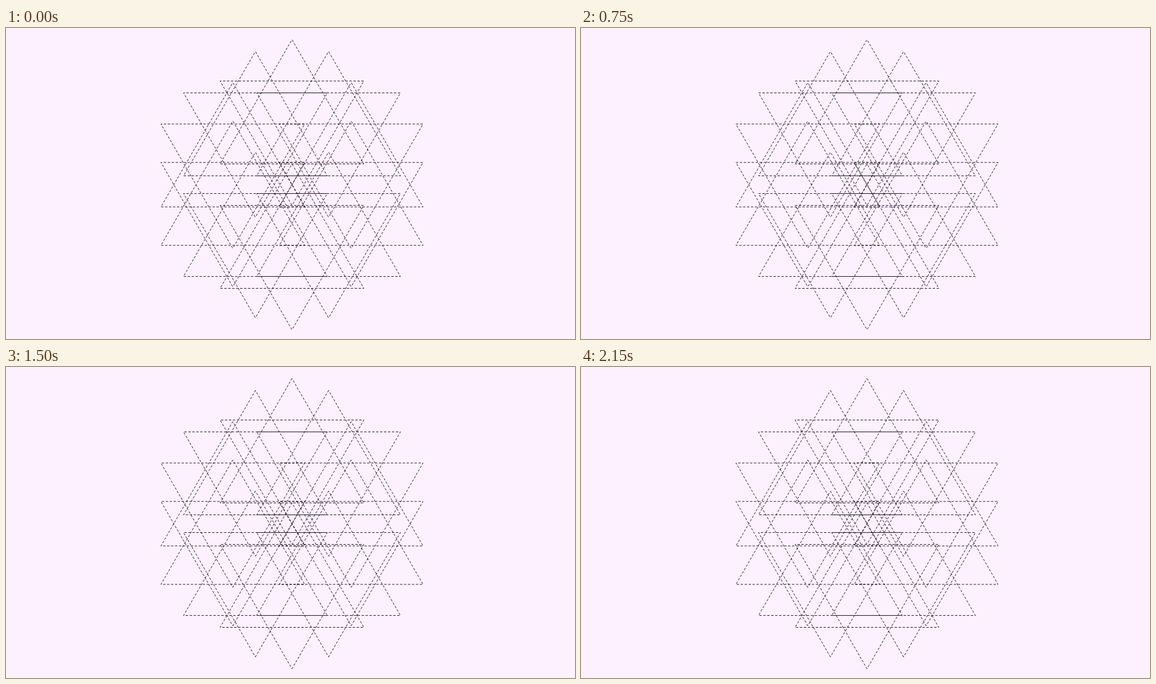
An HTML page for the animation above (2210 ms loop, 960 by 525 pixels).

```html
<!DOCTYPE html>
<html lang="en">
<head>
<meta charset="utf-8">
<title>Marching triangles</title>
<style>
  html, body { margin: 0; width: 100%; height: 100%; overflow: hidden; background: #fdf1ff; }
  svg { display: block; width: 960px; height: 525px; }
  path { fill: none; stroke: #000; stroke-width: .88; stroke-dasharray: 4 2.6667; }
</style>
</head>
<body>
<svg viewBox="0 0 960 525"><path id="art"/></svg>
<script>
const LOOP = 2210, STEP = 50, LAST = 43;
const CX = 482.5, CY = 264.5;
const HEIGHT = 210, RADIUS = 105, COUNT = 10;
const HALF = HEIGHT / Math.sqrt(3);
const SPEED = 20 / 3;   // px per second, one dash period
const START = -0.63;

// Apexes sit on a ring; side -1 gives the same ring turned half round.
function ring(side) {
  let d = '';
  for (let i = 0; i < COUNT; i++) {
    const a = i * 2 * Math.PI / COUNT;
    const x = CX + side * RADIUS * Math.sin(a);
    const y = CY - side * (140 + RADIUS * Math.cos(a));
    d += `M${x} ${y}l${side * HALF} ${side * HEIGHT}h${-2 * side * HALF}z`;
  }
  return d;
}

// One path for all, so crossing lines do not darken each other.
const art = document.getElementById('art');
art.setAttribute('d', ring(1) + ring(-1));

const begin = performance.now();

function draw(now) {
  const time = Math.max(0, now - begin) % LOOP;
  const tick = Math.min(LAST, Math.floor(time / STEP));
  art.style.strokeDashoffset = START + SPEED * tick * STEP / 1000;
  requestAnimationFrame(draw);
}

draw(begin);
</script>
</body>
</html>
```
